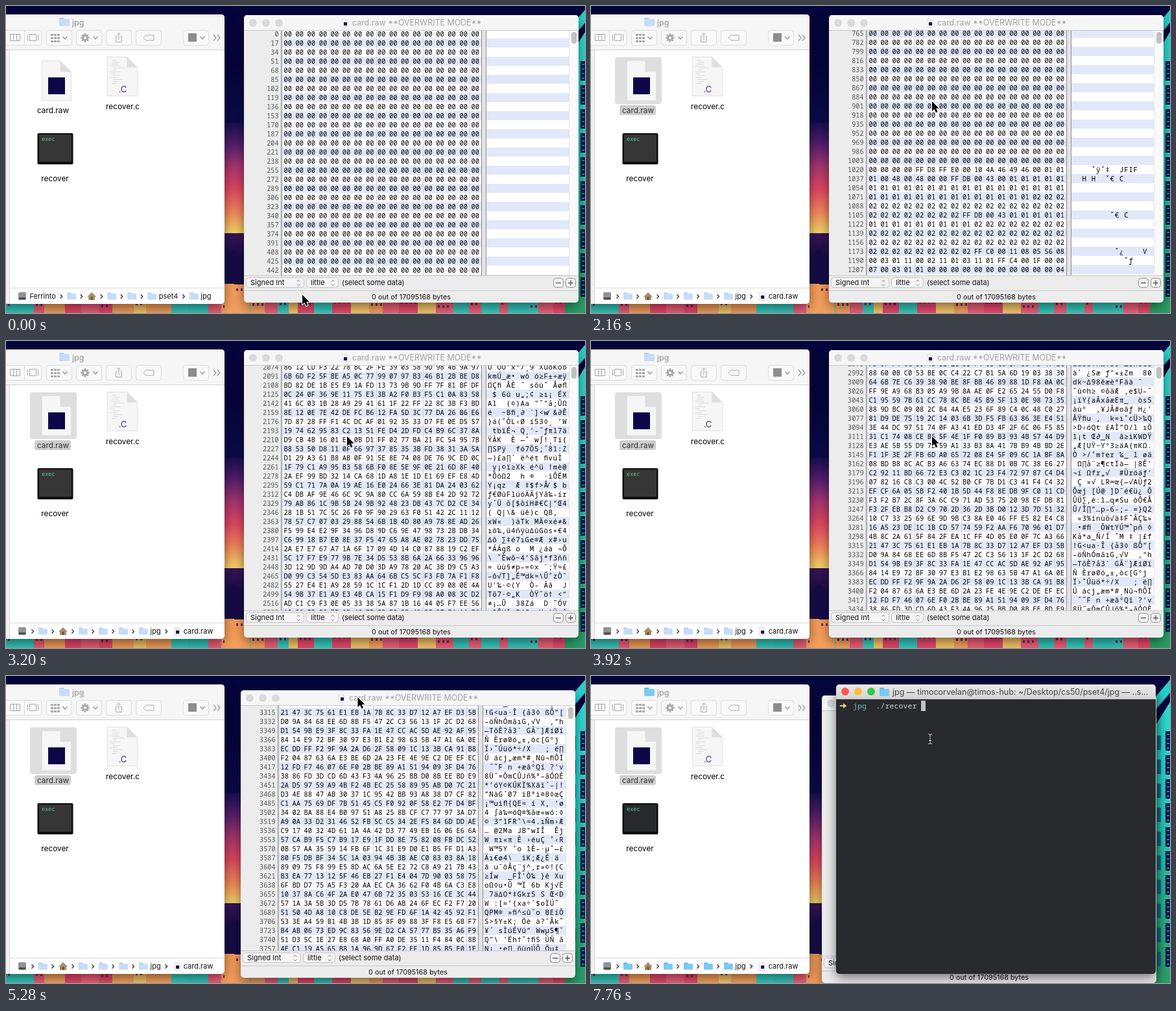
These frames come from a looping animation (893 by 473 pixels, 8 s). An HTML page with a canvas:

```html
<!DOCTYPE html>
<html lang="en">
<head>
<meta charset="utf-8">
<title>Byte viewer</title>
<style>
html, body { margin: 0; width: 100%; height: 100%; overflow: hidden; background: #06063c; }
canvas { display: block; }
</style>
</head>
<body>
<canvas id="stage" width="893" height="473"></canvas>
<script>
const W = 893, H = 473, LOOP = 8000, TICK = 80;
const UI = 'Inter, "Open Sans", sans-serif';
const MONO = '"Noto Sans Mono", "DejaVu Sans Mono", monospace';
const canvas = document.getElementById('stage');
let ctx = canvas.getContext('2d');

// drawing helpers
function rect(x, y, w, h, fill) { ctx.fillStyle = fill; ctx.fillRect(x, y, w, h); }
function round(x, y, w, h, r, fill, stroke) {
  ctx.beginPath();
  ctx.roundRect(x, y, w, h, r);
  if (fill) { ctx.fillStyle = fill; ctx.fill(); }
  if (stroke) { ctx.strokeStyle = stroke; ctx.lineWidth = 1; ctx.stroke(); }
}
function dot(x, y, r, fill) {
  ctx.beginPath();
  ctx.arc(x, y, r, 0, Math.PI * 2);
  ctx.fillStyle = fill; ctx.fill();
}
// SVG path placed at x, y
function shape(d, x, y, fill, stroke, width = 1) {
  const p = new Path2D(d);
  ctx.save();
  ctx.translate(x, y);
  ctx.lineJoin = 'round';
  if (stroke) { ctx.strokeStyle = stroke; ctx.lineWidth = width; ctx.stroke(p); }
  if (fill) { ctx.fillStyle = fill; ctx.fill(p); }
  ctx.restore();
}
function text(s, x, y, size, fill, align = 'left', font = UI) {
  ctx.font = `${font === MONO ? 500 : 400} ${size}px ${font}`;
  ctx.textAlign = align;
  ctx.fillStyle = fill;
  ctx.fillText(s, x, Math.round(y + size * 0.36));
  return ctx.measureText(s).width;
}
function vGrad(y0, y1, ...colors) {
  const g = ctx.createLinearGradient(0, y0, 0, y1);
  colors.forEach((c, i) => g.addColorStop(i / (colors.length - 1), c));
  return g;
}
function windowBox(x, y, w, h, fill) {
  ctx.save();
  ctx.shadowColor = 'rgba(0,0,0,0.5)';
  ctx.shadowBlur = 18;
  ctx.shadowOffsetY = 6;
  round(x, y, w, h, 5, fill);
  ctx.restore();
}
function clipped(x, y, w, h, paint) {
  ctx.save();
  ctx.beginPath(); ctx.rect(x, y, w, h); ctx.clip();
  paint();
  ctx.restore();
}
// 0..1 between two times, and a mix of two values
const ramp = (t, a, b) => Math.min(1, Math.max(0, (t - a) / (b - a)));
const mix = (a, b, k) => a + (b - a) * k;
function hash(n) {
  n = Math.imul(n ^ (n >>> 15), 0x2c1b3c6d) + 0x5bd1e995 | 0;
  n = Math.imul(n ^ (n >>> 12), 0x297a2d39);
  return (n ^ (n >>> 15)) >>> 0;
}

// file bytes: zeros, a JPEG header, then noise
const COLS = 17, ROW = 14, JPEG_AT = 1024;
const quantTable = (id, ones) => 'FFDB0043' + id + '01'.repeat(ones) + '02'.repeat(64 - ones);
const header = 'FFD8FFE000104A46494600010101004800480000' +
  quantTable('00', 36) + quantTable('01', 13) +
  'FFC00011080556080003011100021101031101' +
  'FFC4001F00000700030101' + '00'.repeat(11) + '04';
function byteAt(i) {
  const k = (i - JPEG_AT) * 2;
  if (k < 0) return 0;
  return k < header.length ? parseInt(header.slice(k, k + 2), 16) : hash(i) & 255;
}
const roman = new TextDecoder('macintosh');
const glyphs = Array.from({ length: 256 }, (_, b) =>
  b < 33 || b === 127 || b === 240 ? '' : roman.decode(new Uint8Array([b])));

// wallpaper, painted once
function skyline(x0, x1, top, seed) {
  const tones = ['#f6a05c', '#ee5f79', '#34c4bb', '#f7c568', '#e8486c', '#36c9bd'];
  for (let x = x0, i = seed; x < x1; i++) {
    const w = 12 + hash(i) % 22, y = top + hash(i + 50) % 8;
    rect(x, y, w, H - y, tones[hash(i + 7) % tones.length]);
    if (i % 2) for (let wx = x + 3; wx < x + w - 3; wx += 7) rect(wx, y + 6, 3, 4, '#7c2a5a');
    x += w;
  }
}
function paintWallpaper() {
  rect(0, 0, W, H, '#05053d');
  rect(337, 90, 30, 90, vGrad(90, 180, '#05053d', '#0d0b4c'));
  rect(337, 180, 30, 170, vGrad(180, 350, '#180f54', '#57206f', '#a9376f', '#e04862', '#f3855c', '#f5d868'));
  rect(337, 350, 30, 80, vGrad(350, 430, '#3a1659', '#150c45', '#0a0838'));
  shape('M0 40L14 22 30 36V80H0Z', 337, 352, '#170d48');
  skyline(0, W, 448, 3);
  skyline(337, 367, 428, 12);
  // tower at the right edge
  shape('M0 36L31 0V20L0 56Z', 862, 6, '#27cfcc');
  shape('M0 50L31 0V440H0Z', 862, 40, vGrad(0, 430, '#2bdcd4', '#29d0c6', '#25b996', '#2a9f67'));
  for (let y = 85; y < 450; y += 37) {
    rect(886, y, 7, 30, '#0b1650');
    rect(873, y + 7, 6, 22, '#176a8c');
    for (let k = 4; k < 28; k += 7) rect(888, y + k, 4, 2, '#1d8aa0');
  }
}
const wall = document.createElement('canvas');
wall.width = W; wall.height = H;
const screen = ctx;
ctx = wall.getContext('2d');
paintWallpaper();
ctx = screen;

// icons
function folder(x, y, w, h, vivid) {
  round(x, y, w * 0.48, h * 0.5, 1.5, vivid ? '#5bb9e8' : '#b5cef0');
  round(x, y + h * 0.15, w, h * 0.85, 1.5, vivid ? '#79cbf3' : '#c6dcf8');
}
function sheet(x, y, w, h, fold) {
  shape(`M0 0H${w - fold}L${w} ${fold}V${h}H0Z`, x, y, '#f6f6f6', '#cfcfcf');
  shape(`M0 0L${fold} ${fold}H0Z`, x + w - fold, y, '#dedede');
}
function miniDoc(x, y) {
  sheet(x + 0.5, y + 0.5, 9, 12, 3);
  rect(x + 3, y + 5, 5, 5, '#17114a');
}
const chevron = (x, y) => shape('M-1.5-3L1.5 0-1.5 3', x, y, null, '#333', 1.4);
const down = (x, y) => shape('M-3.5-2L0 2 3.5-2', x, y, null, '#999', 1.4);

function toolbar() {
  const ink = '#a9a9a9', face = '#f9f9f9';
  const button = (x, w) => round(x, 37.5, w, 23, 4, face, '#dddddd');
  button(-6, 61);
  for (let x = 62.5; x < 240; x += 46) button(x, 39);
  button(273.5, 39);
  rect(28, 38, 1, 23, '#dddddd');
  shape('M0 0H15V10H0ZM5 0V10M10 0V10', 6.5, 43.5, null, ink);
  shape('M0 0V10M3 0H13V10H3ZM16 0V10', 33.5, 43.5, null, ink);
  for (let i = 0; i < 9; i++) rect(69 + i % 3 * 5, 43 + (i / 3 | 0) * 5, 4, 3, ink);
  [91, 138, 303].forEach(x => down(x, 49));
  for (let a = 0; a < 8; a++) {
    const turn = a * Math.PI / 4;
    dot(122 + Math.cos(turn) * 5.5, 49 + Math.sin(turn) * 5.5, 1.4, ink);
  }
  dot(122, 49, 5, ink);
  dot(122, 49, 2, face);
  shape('M-2-2H-4.5V6.5H4.5V-2H2M0 3V-7M-3-4.5L0-7.5 3-4.5', 174, 49, null, ink);
  shape('M0 0L4-4H16V4H4Z', 212, 49, null, ink);
  rect(281, 42, 13, 13, '#8d8d8d');
  shape('M0-4.5L4 0 0 4.5M6-4.5L10 0 6 4.5', 320, 49, null, '#999', 1.3);
}

const crumbIcon = {
  disk(x) { round(x, 441, 12, 12, 2, '#929296'); rect(x + 1, 449, 10, 3, '#4d4d52'); },
  home(x) { shape('M0-6L7 1H5V6H-5V1H-7Z', x + 7, 447, '#a98c6a'); rect(x + 5.5, 448, 3, 5, '#6f5137'); },
  folder(x, vivid) { folder(x, 441.5, 14, 11, vivid); },
  doc(x) { miniDoc(x + 3, 441); }
};
function pathBar(selected, vivid) {
  const crumbs = selected
    ? ['disk', 'folder', 'home', 'folder', 'folder', 'folder', 'folder:jpg', 'doc:card.raw']
    : ['disk:Ferrinto', 'folder', 'home', 'folder', 'folder', 'folder:pset4', 'folder:jpg'];
  let x = 19;
  crumbs.forEach((crumb, i) => {
    const [icon, label] = crumb.split(':');
    if (i) { chevron(x, 447.5); x += 9; }
    crumbIcon[icon](x, vivid);
    x += label ? 26 + text(label, x + 17.5, 447, 11, '#111') : 22;
  });
}

function finder(selected, vivid) {
  windowBox(-20, 13, 357, 446, '#fff');
  round(-20, 13, 357, 55, [5, 5, 0, 0], '#f6f6f6');
  rect(0, 67, 337, 1, '#d2d2d2');
  rect(0, 68, 5, 391, '#f1f1f1');
  rect(5, 68, 1, 391, '#d4d4d4');
  folder(82, 18, 16, 13, vivid);
  text('jpg', 102, 25, 12.5, '#8f8f8f');
  toolbar();

  if (selected) {
    round(37, 79, 72, 72, 4, '#dedede');
    round(44, 153, 56, 15, 3, '#cdcdcd');
  }
  sheet(55.5, 84.5, 45, 61, 17);
  rect(65, 110, 26, 26, '#0d0648');
  text('card.raw', 72.5, 160.5, 11.8, selected ? '#333' : '#000', 'center');

  sheet(156.5, 78.5, 46, 60, 16);
  for (let i = 0; i < 13; i++) rect(161 + hash(i) % 3 * 2, 83 + i * 3, 6 + hash(i + 3) % 16, 1, '#dadada');
  text('.C', 180, 128, 13, '#46257f', 'center');
  text('recover.c', 180, 155, 11.8, '#000', 'center');

  round(48.5, 196, 55, 48, 2, '#0b0b0b');
  rect(51, 198, 50, 42, vivid ? '#27292d' : '#363636');
  text('exec', 55, 205, 8.6, '#55c987', 'left', MONO);
  text('recover', 75.5, 266, 11.8, '#000', 'center');

  rect(6, 434, 331, 1, '#d9d9d9');
  pathBar(selected, vivid);
}

function hexRows(scroll) {
  const first = Math.max(0, Math.floor(scroll / ROW) - 1);
  for (let r = first; r < first + 30; r++) {
    const y = 43 + r * ROW - scroll;
    if (r % 2) rect(427, y - 7, 442, ROW, '#e2e8fa');
    for (let c = 4; c < COLS; c += 4) rect(Math.round(426.5 + c * 18.06), y - 7, 1, ROW, '#cdd0d6');
    text(r * COLS, 420.5, y, 10.2, '#555', 'right', MONO);
    for (let c = 0; c < COLS; c++) {
      const b = byteAt(r * COLS + c);
      text(b.toString(16).toUpperCase().padStart(2, '0'), 428.5 + c * 18.06, y, 10.4, '#000', 'left', MONO);
      if (glyphs[b]) text(glyphs[b], 743 + c * 7.2, y, 10.8, '#000', 'left', MONO);
    }
  }
}

function popup(x, w, label) {
  round(x + 0.5, 418.5, w, 15, 4, '#f5f5f5', '#c4c4c4');
  text(label, x + 7, 426.5, 11, '#111');
  shape('M-2.5-2L0-4.5 2.5-2M-2.5 2L0 4.5 2.5 2', x + w - 8, 426.5, null, '#888');
}

function hexWindow(scroll, drag) {
  ctx.save();
  ctx.translate(Math.round(-11 * drag), Math.round(16 * drag));
  windowBox(367, 14, 516, 443, '#ececec');
  round(367, 14, 516, 24, [5, 5, 0, 0], '#f6f6f6');
  for (let x = 381; x < 430; x += 20) dot(x, 26, 6, '#dadada');
  miniDoc(518, 20);
  text('card.raw **OVERWRITE MODE**', 534, 26, 12.4, '#a0a0a0');

  clipped(367, 37, 516, 378, () => {
    rect(425, 37, 458, 378, '#fff');
    hexRows(scroll);
    rect(425, 37, 2, 378, '#d6d6d6');
    rect(733, 37, 8, 378, '#e3e3e3');
    for (const x of [424, 733, 740]) rect(x, 37, 1, 378, '#8d8d8d');
    rect(868, 37, 15, 378, '#fafafa');
    rect(868, 37, 1, 378, '#e3e3e3');
    round(872, 40, 8, 18, 4, '#c1c1c1');
  });

  for (const y of [37, 415, 438]) rect(367, y, 516, 1, '#c9c9c9');
  popup(370, 89, 'Signed Int');
  popup(463, 49, 'little');
  text('(select some data)', 518, 426.5, 11, '#111');
  for (const x of [844.5, 863.5]) {
    round(x, 419.5, 15, 14, 4, '#f4f4f4', '#8f8f8f');
    rect(x + 3.5, 426, 8, 1.4, '#555');
  }
  rect(870.3, 422.6, 1.4, 8, '#555');
  text('0 out of 17095168 bytes', 625, 448, 10.8, '#111', 'center');
  ctx.restore();
}

// two pairs of keystrokes, then tab completes the word
function typed(t) {
  const done = './recover ';
  if (t >= 7760) return done;
  const n = [6800, 6880, 7040, 7120].filter(at => t >= at).length;
  return done.slice(0, n);
}
function terminal(t) {
  windowBox(378, 13, 493, 446, '#282a2e');
  round(378, 13, 493, 23, [5, 5, 0, 0], vGrad(13, 36, '#e9e9e9', '#d3d3d3'));
  rect(378, 35, 493, 1, '#b3b3b3');
  ['#fc5753', '#fdbc40', '#33c748'].forEach((c, i) => dot(392 + i * 20, 24, 6, c));
  folder(445, 18, 15, 13, true);
  text('jpg — timocorvelan@timos-hub: ~/Desktop/cs50/pset4/jpg — ..s...', 465, 24.5, 12.5, '#444');
  if (t < 6080) return;
  const line = typed(t);
  shape('M0-1H5V-4L10.5 0 5 4V1H0Z', 384, 46, '#e6cf73');
  text('jpg', 404, 46, 11.67, '#75b9bd', 'left', MONO);
  text(line, 439.5, 46, 11.67, '#cfd0d0', 'left', MONO);
  rect(439 + line.length * 7, 38, 7, 16, '#bfc1c3');
}

const arrow = (x, y) => shape('M0 0V15L3.4 11.8 6 17.2 8.6 16 6.2 10.8H10.8Z', x, y, '#000', '#fff', 2);
function beam(x, y) {
  const d = 'M-3-7.5H-1L0-6 1-7.5H3M0-6V6M-3 7.5H-1L0 6 1 7.5H3M-2 2.5H2';
  shape(d, x, y, null, '#111', 2.6);
  shape(d, x, y, null, '#d6d6d6', 1.1);
}

// moves of the pointer: from the start, each with its time span and goal
const MOVES = [
  { from: 0, to: 720, x: 77, y: 115 },
  { from: 880, to: 1440, x: 526, y: 147 },
  { from: 4240, to: 4720, x: 548, y: 25 },
  { from: 5120, to: 5440, x: 537, y: 41 },
  { from: 5440, to: 5920, x: 523, y: 97 }
];
function pointer(t) {
  return MOVES.reduce(([x, y], m) => {
    const k = ramp(t, m.from, m.to);
    return [mix(x, m.x, k), mix(y, m.y, k)];
  }, [457, 445]);
}
// a quick flick, a steady pace, then a slower end
function scrollAt(t) {
  return Math.round(631 * ramp(t, 1520, 2160) + 1827 * ramp(t, 2160, 3920) + 267 * ramp(t, 3920, 4240));
}

function draw(t) {
  const late = t >= 5600;
  ctx.drawImage(wall, 0, 0);
  hexWindow(scrollAt(t), ramp(t, 5120, 5440));
  finder(t >= 800, late);
  if (late) terminal(t);
  (late ? beam : arrow)(...pointer(t));
}

const start = performance.now();
function frame() {
  const t = (performance.now() - start) % LOOP;
  draw(Math.floor(t / TICK) * TICK);
  requestAnimationFrame(frame);
}
frame();
</script>
</body>
</html>
```
